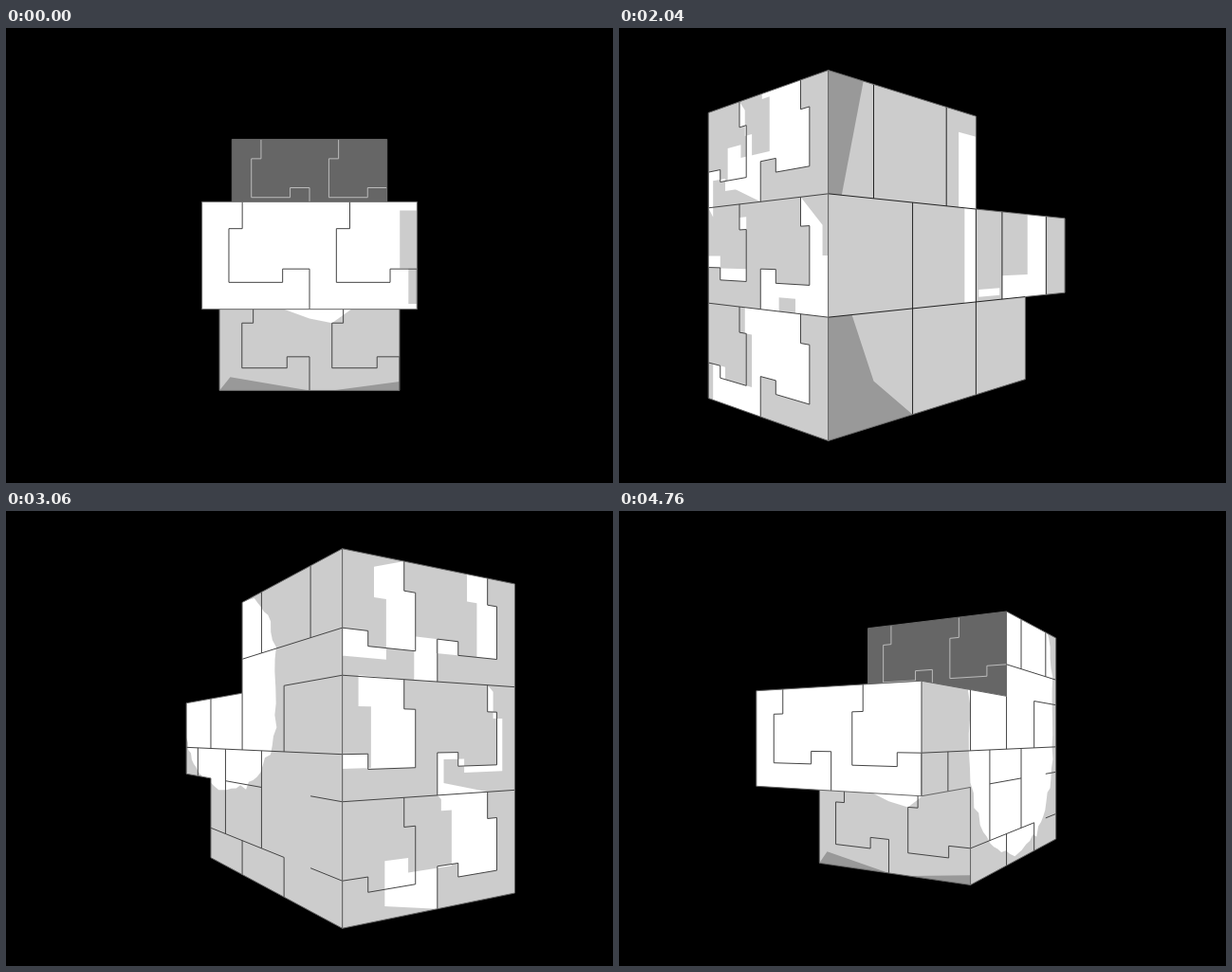
An HTML page with a canvas that plays this animation: 640 by 480 pixels, repeating every 5100 ms.

```html
<!DOCTYPE html>
<html>
<head>
<meta charset="utf-8">
<style>
html, body { margin: 0; width: 100%; height: 100%; overflow: hidden; background: #000; }
canvas { display: block; }
</style>
</head>
<body>
<canvas id="stage" width="640" height="480"></canvas>
<script>
const ctx = document.getElementById('stage').getContext('2d');
const FOCAL = 585, STEPS = 15, STEP_MS = 340;
const WHITE = '#fff', LIGHT = '#ccc', MID = '#999', DARK = '#666';

const clamp = (x, lo, hi) => Math.min(hi, Math.max(lo, x));
const rect = (u0, v0, u1, v1) => [[u0, v0], [u1, v0], [u1, v1], [u0, v1]];
const upright = (v0, v1, ...us) => us.map(u => [[u, v0], [u, v1]]);
const level = (v, u0, u1) => [[u0, v], [u1, v]];

function random(seed) {
  return () => (seed = seed * 16807 % 2147483647) / 2147483647;
}

// Jigsaw seam, repeated in both unit cells of a block end
const SEAM = [[.375, 0], [.375, .25], [.25, .25], [.25, .75], [.75, .75], [.75, .625], [1, .625], [1, 1]];
const seam = (x, top) => SEAM.map(([u, v]) => [x + u, top - v]);
const seams = top => [seam(-1, top), seam(0, top)];

const SIDE = [[-2.25, 1.5], [-.25, 1.5], [-.25, .5], [1.75, .5], [1.75, -.5], [.75, -.5], [.75, -1.5], [-2.25, -1.5]];

// Sheen painters return [colour, outline] pairs in face units

function frontSheen(step, view) {
  const rim = 1 - .16 * Math.max(0, 1 - 3 * Math.abs(view.s));
  return [[LIGHT, rect(rim, .42, 1, -.12)], [LIGHT, rect((1 + rim) / 2, -.12, 1, -.45)]];
}

function bottomSheen() {
  return [
    [WHITE, [[-.55, -.5], [.6, -.5], [.25, -.75], [0, -.7]]],
    [MID, [[-1, -1.5], [-.88, -1.35], [0, -1.5]]],
    [MID, [[.25, -1.5], [1, -1.4], [1, -1.5]]]
  ];
}

// White panels whose edges slide, and a shadow growing from the far corner
function leftSheen(step) {
  const k = clamp(step - 4, 0, 2), grow = .2 + .4 * k;
  const shadow = [[0, 0], [0, 1], [.25, 1], [.5, .4], [1, 0]];
  return [
    [WHITE, rect(-.75 + .1 * k, 1.28, -.25, .5)],
    [WHITE, rect(-1.25 + .4 * k, .5, -.25, -.5)],
    [WHITE, rect(.25, .5, 1.25, -.5)],
    [LIGHT, rect(.65 - .2 * k, .5, 1.1 - .15 * k, -.43 + .1 * k)],
    [WHITE, rect(-.2, -.37, .2, -.85 + .2 * k)],
    [MID, shadow.map(([u, v]) => [-2.25 + u * grow, -1.5 + v * grow])],
    [MID, [[-2.25, 1.5], [-2.25 + .19 * k, 1.5], [-2.25 + .07 * k, .5], [-2.25, .5]]]
  ];
}

// Seam shift (right, down) per cell, at steps 6, 8 and 10
const POCKETS = [
  [[.1, .1], [-.03, .09], [-.6, .1]], [[-.6, -.2], [-.13, .1], [-.4, -.1]],
  [[0, -.12], [-.04, -.02], [-.9, 0]], [[.3, .25], [0, .02], [.15, .1]],
  [[0, 0], [0, 0], [0, 0]], [[-.9, 0], [-.26, -.22], [-.9, 0]]
];

// Each pocket shows its wall as the band between a seam and its shifted copy
function backSheen(step) {
  const t = clamp((step - 6) / 2, 0, 2), i = Math.min(1, Math.floor(t));
  return POCKETS.map((keys, n) => {
    const [dx, dy] = [0, 1].map(a => keys[i][a] + (keys[i + 1][a] - keys[i][a]) * (t - i));
    const edge = seam(-(n % 2), 1.5 - (n >> 1));
    return [WHITE, edge.concat(edge.map(([u, v]) => [u - dx, v - dy]).reverse())];
  });
}

// Ragged highlight drifting towards the back as the block turns
function rightSheen(step) {
  const k = clamp((step - 12) / 2, -1, 1), rnd = random(7), spot = [];
  const round = x => Math.sign(x) * Math.abs(x) ** .8;
  for (let i = 0; i < 70; i++) {
    const a = i / 70 * 2 * Math.PI, r = .96 + .07 * rnd();
    spot.push([-.15 - .5 * k + 1.45 * r * round(Math.cos(a)), .4 - .1 * k + (1.4 + .3 * k) * r * round(Math.sin(a))]);
  }
  return [[WHITE, spot]];
}

// Drawn in this order; each face lies in the plane axis = k
const faces = [
  { axis: 'z', k: -.25, sign: 1, fill: DARK, ink: '#bbb', shape: rect(-1, 1.5, 1, .5), lines: seams(1.5) },
  { axis: 'z', k: .75, sign: 1, fill: LIGHT, shape: rect(-1, -.5, 1, -1.5), lines: seams(-.5), sheen: bottomSheen },
  {
    axis: 'z', k: -2.25, sign: -1, fill: LIGHT, shape: rect(-1, 1.5, 1, -1.5), sheen: backSheen,
    lines: [...[1.5, .5, -.5].flatMap(seams), level(.5, -1, 1), level(-.5, -1, 1)]
  },
  {
    axis: 'x', k: -1, sign: -1, fill: LIGHT, ink: '#222', shape: SIDE, sheen: leftSheen,
    lines: [
      level(.5, -2.25, -.25), level(-.5, -2.25, .75),
      ...upright(1.5, .5, -1.75, -.75), ...upright(.5, -.5, .25, 1.25), ...upright(.5, -1.5, -1.25, -.25)
    ]
  },
  {
    axis: 'x', k: 1, sign: 1, fill: LIGHT, shape: SIDE, sheen: rightSheen,
    lines: [
      level(.875, -2.25, -.25), level(.5, -2.25, -1.25), level(-.125, -2.25, 1.75), level(-.5, -.75, .25),
      level(-.5, -2.25, -1.75), level(-1.125, -1.25, .75), level(-1.125, -2.25, -1.75),
      ...upright(1.5, .875, -1.75, -.75), ...upright(.5, -.125, -1.25, -.25, .75), ...upright(-.125, -.5, 1.25),
      ...upright(-.125, -1.125, -.75, .25), ...upright(-1.125, -1.5, -1.25, -.25)
    ]
  },
  { axis: 'z', k: 1.75, sign: 1, fill: WHITE, shape: rect(-1, .5, 1, -.5), lines: seams(.5), sheen: frontSheen }
];

// The loop opens on a straight view, then turns 24 degrees a step
function viewAt(step) {
  const a = step ? (24 * step - 6) * Math.PI / 180 : 0;
  return { c: Math.cos(a), s: Math.sin(a), dist: step ? 6.83 : 6.91 };
}

function project(face, view, [u, y]) {
  const [x, z] = face.axis === 'z' ? [u, face.k] : [face.k, u];
  const scale = FOCAL / (view.dist - z * view.c + x * view.s);
  return [320 + scale * (x * view.c + z * view.s), 240 - scale * y];
}

function trace(face, view, pts, close) {
  ctx.beginPath();
  for (const p of pts) ctx.lineTo(...project(face, view, p));
  if (close) ctx.closePath();
}

function drawFace(face, view, step) {
  const eye = face.axis === 'z' ? view.dist * view.c : -view.dist * view.s;
  if ((eye - face.k) * face.sign <= 0) return;
  ctx.save();
  trace(face, view, face.shape, true);
  ctx.fillStyle = face.fill;
  ctx.fill();
  ctx.clip();
  for (const [fill, shape] of face.sheen ? face.sheen(step, view) : []) {
    trace(face, view, shape, true);
    ctx.fillStyle = fill;
    ctx.fill();
  }
  ctx.strokeStyle = face.ink || '#444';
  for (const line of face.lines) {
    trace(face, view, line);
    ctx.stroke();
  }
  ctx.restore();
  trace(face, view, face.shape, true);
  ctx.strokeStyle = DARK;
  ctx.stroke();
}

function draw(step) {
  ctx.fillStyle = '#000';
  ctx.fillRect(0, 0, 640, 480);
  const view = viewAt(step);
  for (const face of faces) drawFace(face, view, step);
}

function tick() {
  draw(Math.floor(performance.now() / STEP_MS) % STEPS);
  requestAnimationFrame(tick);
}
tick();
</script>
</body>
</html>
```
